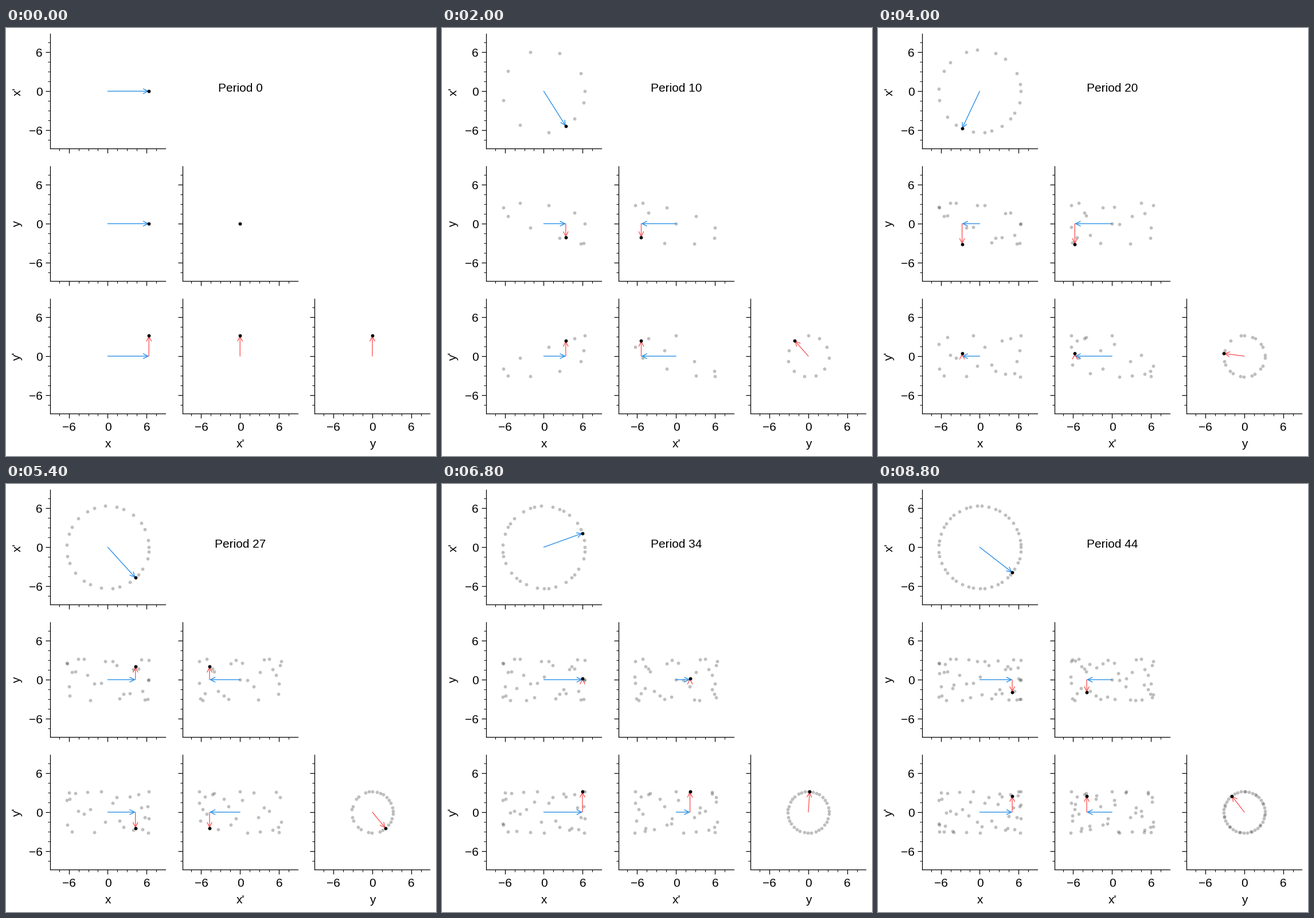
Animation of 750x746 px, one loop 9000 ms. Source, as a matplotlib script:

```python
import numpy as np
import matplotlib.pyplot as plt
from matplotlib.animation import FuncAnimation
from matplotlib.patches import FancyArrowPatch

WIDTH, HEIGHT, DPI = 750, 746, 100
PERIODS, STEP_MS = 45, 200

UNIT = 11.31                      # pixels per data unit
HALF_W, HALF_H = 100.5, 100.3     # half panel size in pixels
COL_X = 177.45 + 230.75 * np.arange(3)
ROW_Y = 110.15 + 230.9 * np.arange(3)

AMP_X, AMP_Y = 6.35, 3.18
STEP_X, STEP_Y = np.radians(41.77), np.radians(31.87)
BLUE, RED = "#228be6", "#fa5252"
NAMES = ["x", "x'", "y", "y'"]
MAJOR = [-6, 0, 6]
MINOR = [1.5 * k for k in range(-5, 6) if k % 4]

plt.rcParams["font.family"] = "Liberation Sans"
plt.rcParams["font.size"] = 15

fig = plt.figure(figsize=(WIDTH / DPI, HEIGHT / DPI), dpi=DPI, facecolor="white")

n = np.arange(PERIODS)
coords = np.array([
    AMP_X * np.cos(n * STEP_X),
    -AMP_X * np.sin(n * STEP_X),
    AMP_Y * np.sin(n * STEP_Y),
    AMP_Y * np.cos(n * STEP_Y),
])


def label(x, y, text, ha="center", rotation=0):
    """Text with its baseline at a pixel position counted from the top left."""
    return fig.text(x / WIDTH, 1 - y / HEIGHT, text, ha=ha, va="baseline",
                    rotation=rotation, rotation_mode="anchor")


def tick_text(value):
    return str(value).replace("-", "\u2212")


def make_axes(row, col):
    left = COL_X[col] - HALF_W
    bottom = HEIGHT - ROW_Y[row] - HALF_H
    ax = fig.add_axes([left / WIDTH, bottom / HEIGHT,
                       2 * HALF_W / WIDTH, 2 * HALF_H / HEIGHT])
    ax.patch.set_visible(False)
    ax.spines[["top", "right"]].set_visible(False)
    ax.spines[["left", "bottom"]].set_linewidth(0.9)
    for axis in (ax.xaxis, ax.yaxis):
        axis.set_ticks(MAJOR)
        axis.set_ticks(MINOR, minor=True)
    ax.tick_params(which="major", length=6, width=0.9,
                   labelbottom=False, labelleft=False)
    ax.tick_params(which="minor", length=3, width=0.72)
    ax.set_xlim(-HALF_W / UNIT, HALF_W / UNIT)
    ax.set_ylim(-HALF_H / UNIT, HALF_H / UNIT)
    return ax


class Panel:
    def __init__(self, row, col):
        self.ax = make_axes(row, col)
        self.u, self.v = coords[col], coords[row + 1]
        self.mixed = col < 2 <= row + 1
        dots = dict(ls="", marker="o", ms=4.2, mew=0, color="black")
        self.trail, = self.ax.plot([], [], alpha=0.25, zorder=2, **dots)
        self.head, = self.ax.plot([], [], zorder=4, **dots)
        if self.mixed:
            colors = [BLUE, RED]
        else:
            colors = [BLUE if col < 2 else RED]
        self.arrows = [self.make_arrow(c) for c in colors]

    def make_arrow(self, color):
        arrow = FancyArrowPatch((0, 0), (1, 0), arrowstyle="->",
                                mutation_scale=15, shrinkA=0, shrinkB=0,
                                color=color, lw=0.95, zorder=3)
        self.ax.add_patch(arrow)
        return arrow

    def update(self, k):
        u, v = self.u[k], self.v[k]
        self.trail.set_data(self.u[:k], self.v[:k])
        self.head.set_data([u], [v])
        path = [(0, 0), (u, 0), (u, v)] if self.mixed else [(0, 0), (u, v)]
        for arrow, start, end in zip(self.arrows, path, path[1:]):
            arrow.set_positions(start, end)
            arrow.set_visible(np.hypot(end[0] - start[0], end[1] - start[1]) > 0.01)


panels = [Panel(row, col) for row in range(3) for col in range(row + 1)]

for i in range(3):
    label(COL_X[i] + 0.5, 731, NAMES[i])
    label(25.5, ROW_Y[i] + 0.5, NAMES[i + 1], rotation=90)
    for tick in MAJOR:
        label(COL_X[i] + 0.3 + tick * UNIT, 701.5, tick_text(tick))
        label(64, ROW_Y[i] - tick * UNIT + 7.7, tick_text(tick), ha="right")

title = label(408.7, 111, "")


def update(k):
    title.set_text(f"Period {k}")
    for panel in panels:
        panel.update(k)
    return []


anim = FuncAnimation(fig, update, frames=PERIODS, interval=STEP_MS,
                     repeat=True, repeat_delay=0, blit=False)
plt.show()
```
